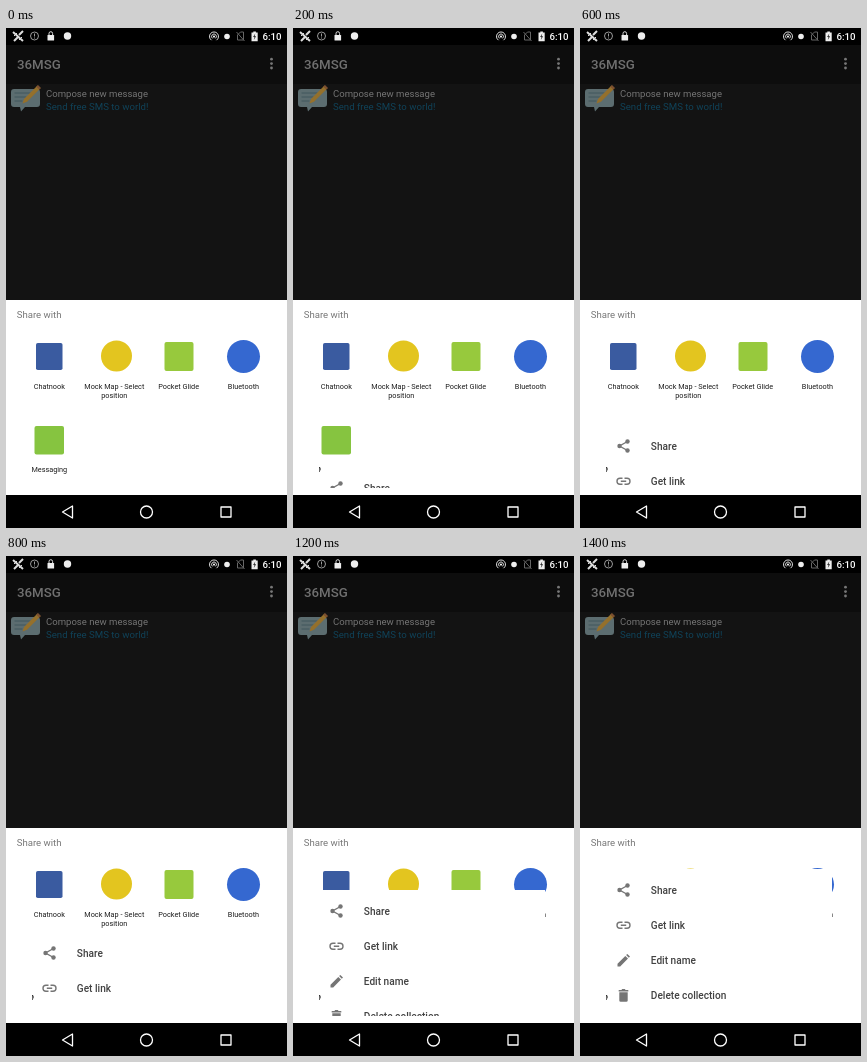
An HTML page for the animation above (1600 ms loop, 281 by 500 pixels).

```html
<!DOCTYPE html>
<html lang="en">
<head>
<meta charset="utf-8">
<title>Share sheet</title>
<style>
  html, body { margin: 0; width: 100%; height: 100%; overflow: hidden; background: #000; }
  svg { display: block; width: 100vw; height: 100vh; }
  text { font-family: Roboto, "Noto Sans", sans-serif; }
  .label { font-size: 7.3px; fill: #1c1c1c; text-anchor: middle; }
  .item { font-size: 10.1px; font-weight: 500; fill: #424242; }
  .icon { fill: #757575; }
  .line { fill: none; stroke: #757575; stroke-width: 1.4; }
  .nav { fill: none; stroke: #fff; stroke-width: 1.3; stroke-linejoin: round; }
  #menu { animation: rise 1600ms steps(8, end) infinite; }
  @keyframes rise { from { transform: translateY(0); } to { transform: translateY(-168px); } }
</style>
</head>
<body>
<svg viewBox="0 0 281 500" preserveAspectRatio="none">
  <defs>
    <clipPath id="window"><rect x="28" y="300" width="224" height="160"/></clipPath>
  </defs>

  <rect width="281" height="500" fill="#000"/>
  <rect y="17" width="281" height="39" fill="#0d0d0d"/>
  <rect y="56" width="281" height="216" fill="#131313"/>

  <!-- status bar -->
  <g fill="none" stroke="#ddd" stroke-width="1">
    <path d="M7 4l10 9M8 13l4-4M13 7l4-4" stroke-width="2"/>
    <path d="M8 8l3-3M13 12l3-3"/>
    <circle cx="28.5" cy="8" r="4" stroke="#999"/>
    <path d="M28.5 5.5v3M28.5 9.5v1" stroke="#999"/>
    <path d="M43 7V5.5a1.8 1.8 0 0 1 3.6 0V7"/>
    <path d="M205.5 12.2a4.5 4.5 0 1 1 5 0M206.6 10.4a2.4 2.4 0 1 1 2.8 0"/>
    <path d="M231.5 12h6V4h-3l-3 3zM230.5 4l8 9" stroke="#666"/>
  </g>
  <g fill="#eee">
    <rect x="41.5" y="7" width="6.6" height="5.5" rx=".6"/>
    <circle cx="61.5" cy="8" r="3.7"/>
    <circle cx="208" cy="8.6" r="1.1"/>
    <circle cx="221" cy="8.5" r="2.8"/>
    <path d="M245.5 4.5h1.8V3.5h2.6v1h1.8v8.7h-6.2z"/>
  </g>
  <path d="M249.3 5.5l-2.2 3.6h1.4l-.7 3 2.3-3.8h-1.5z" fill="#222"/>
  <text x="256.5" y="12" font-size="9.7" font-weight="500" fill="#fff">6:10</text>

  <!-- dimmed page -->
  <text x="11" y="40.8" font-size="13.3" font-weight="500" fill="#707070">36MSG</text>
  <g fill="#777">
    <circle cx="265.5" cy="31.2" r="1.4"/>
    <circle cx="265.5" cy="35.6" r="1.4"/>
    <circle cx="265.5" cy="40" r="1.4"/>
  </g>
  <path d="M8 61h23q3 0 3 3v12q0 3-3 3H19l-4 4.500-1-4.500H8q-3 0-3-3V64q0-3 3-3z" fill="#5c6d70"/>
  <path d="M8.500 65h16M8.500 69h12M8.500 73h8" fill="none" stroke="#41575c" stroke-width="1"/>
  <path d="M16.500 75.500l1.500-4.500L31.500 57.500l3 2.700L21 73.800z" fill="#94702c"/>
  <path d="M30.200 58.800l1.800-1.800 3 2.900-1.700 1.700z" fill="#7c5030"/>
  <text x="40" y="68.500" font-size="9.55" fill="#757575">Compose new message</text>
  <text x="40" y="81.500" font-size="9.65" fill="#104258">Send free SMS to world!</text>

  <!-- share sheet -->
  <rect y="272" width="281" height="195" fill="#fff"/>
  <text x="10.7" y="290.3" font-size="9.6" fill="#777">Share with</text>
  <rect x="30" y="315" width="26.5" height="27" rx="1.8" fill="#3a5ba0"/>
  <circle cx="110.5" cy="328" r="15.5" fill="#e3c51f"/>
  <rect x="158.5" y="314" width="29" height="29" rx="2" fill="#97c93d"/>
  <circle cx="237.5" cy="328.5" r="16.5" fill="#3568d0"/>
  <rect x="28.5" y="398" width="29.5" height="28.5" rx="2" fill="#86c440"/>
  <text class="label" x="43.3" y="361.3">Chatnook</text>
  <text class="label" x="108.3" y="361.3">Mock Map - Select</text>
  <text class="label" x="108.3" y="370.3">position</text>
  <text class="label" x="172.7" y="361.3">Pocket Glide</text>
  <text class="label" x="237.5" y="361.3">Bluetooth</text>
  <text class="label" x="43.3" y="444.3">Messaging</text>

  <!-- rising menu -->
  <g clip-path="url(#window)">
    <g id="menu">
      <rect x="28" y="460" width="224" height="180" fill="#fff"/>
      <g transform="translate(43.5 481)">
        <path class="line" d="M4-4.5L-4 0l8 4.5"/>
        <g class="icon">
          <circle cx="4" cy="-4.5" r="2.2"/>
          <circle cx="-4" r="2.2"/>
          <circle cx="4" cy="4.5" r="2.2"/>
        </g>
        <text class="item" x="27.3" y="3.5">Share</text>
      </g>
      <g transform="translate(43.5 516.2)">
        <path class="line" d="M-1-3h-2.5a3 3 0 0 0 0 6H-1M1-3h2.5a3 3 0 0 1 0 6H1M-2.7 0h5.4"/>
        <text class="item" x="27.3" y="3.5">Get link</text>
      </g>
      <g transform="translate(43.5 551.4)">
        <path class="icon" d="M-6 6V3.3L1.8-4.5 4.5-1.8-3.3 6zM2.6-5.3L3.8-6.5 6.5-3.8 5.3-2.6z"/>
        <text class="item" x="27.3" y="3.5">Edit name</text>
      </g>
      <g transform="translate(43.5 586.6)">
        <path class="icon" d="M-4.8-5.7h2.7l.8-1h2.6l.8 1h2.7v1.5h-9.6zM-4.2-3.3h8.4V4.8q0 1.4-1.4 1.4h-5.6q-1.4 0-1.4-1.4z"/>
        <text class="item" x="27.3" y="3.5">Delete collection</text>
      </g>
    </g>
  </g>

  <!-- navigation bar -->
  <path class="nav" d="M66.5 478v12L56.5 484z"/>
  <circle class="nav" cx="140.5" cy="484" r="6"/>
  <rect class="nav" x="215" y="479" width="10" height="10"/>
</svg>
</body>
</html>
```
